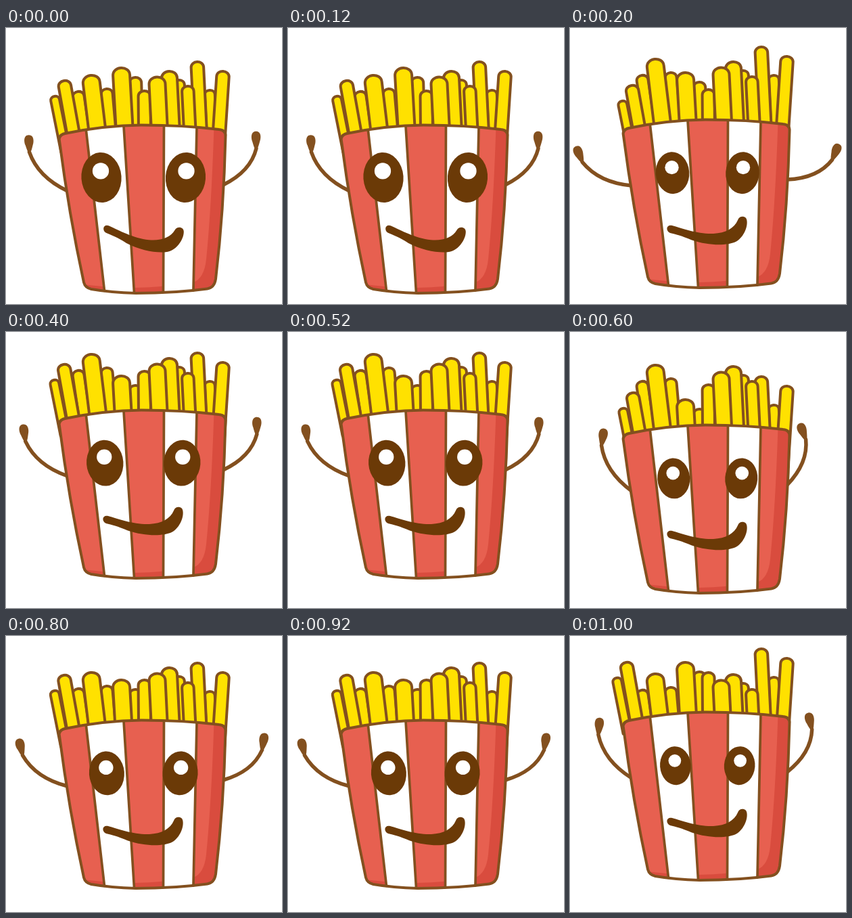
These frames come from a looping animation (408 by 408 pixels, 1.2 s). An HTML page with a canvas:

```html
<!DOCTYPE html>
<html lang="en">
<head>
<meta charset="utf-8">
<title>Happy fries</title>
<style>
  html, body { margin: 0; width: 100%; height: 100%; overflow: hidden; background: #fff; }
  canvas { display: block; width: 100vmin; height: 100vmin; }
</style>
</head>
<body>
<canvas id="stage"></canvas>
<script>
const SIZE = 408, STEP = 200;
const LINE = '#83501f', DARK = '#6b3a07', YELLOW = '#ffe100', RED = '#e76050', SHADE = '#d94c3e';

const canvas = document.getElementById('stage');
const scale = Math.max(1, window.devicePixelRatio || 1);
canvas.width = canvas.height = SIZE * scale;
const ctx = canvas.getContext('2d');

// Key poses: lift of the box, eye height, arm swing in degrees (left, right),
// slide of each bunch of fries inside the box, tilt of the smile
const poses = [
  { lift: 0, eye: 37, arms: [37, 34], slide: [0, 0, 0, 0, 0, 0], tilt: .148 },
  { lift: 8, eye: 31, arms: [57, 58], slide: [15, -16, 15, 6, -6, -14], tilt: 0 },
  { lift: 28, eye: 34, arms: [43, 35], slide: [-2, -9, 34, -7, 3, 9], tilt: 0 },
  { lift: 6, eye: 30, arms: [26, 14], slide: [18, -15, 47, -9, -7, 22], tilt: 0 },
  { lift: 19, eye: 32.5, arms: [48, 44], slide: [-1, 3, 25, -9, 2, 9], tilt: 0 },
  { lift: 31, eye: 28.5, arms: [30, 22], slide: [-8, 17, 11, -8, 24, 0], tilt: 0 }
];

// Back to front: bunch, top x, top y, width
const fries = [
  [0, 70, 101, 13], [1, 106, 94, 17], [0, 84, 78, 18.5],
  [1, 148.5, 90, 17], [1, 125, 70, 25],
  [2, 191, 73, 18], [2, 170, 59, 25], [3, 204.5, 93, 18],
  [4, 255.5, 77, 16], [4, 241, 64, 23], [4, 223, 72.5, 24],
  [5, 301, 92, 15], [5, 282.5, 50, 18.5], [5, 321, 64, 18.5],
  [4, 268.5, 86, 17.5]
];
const FRY_END = 184;

const box = new Path2D(`M79 167 Q77 158.500 87 156 Q145 144 200 143.500
  Q262 143.500 315 150 Q325 151 324.500 160 Q322 270 310 371
  Q308 384 297.500 385.500 Q250 392 192 392 Q155 391 126 386
  Q117 384 115 376 Q93 275 79 167 Z`);
const lit = new Path2D(`M60 130 L308 130 C305 230 301 290 296 342 Q293 370 277 376
  Q233 383 190 384 Q145 384 100 377 Z`);
const stripes = new Path2D(`M118.500 150 L145.500 389 L60 400 L60 140 Z
  M174 130 L189.500 395 L232.500 395 L233.500 130 Z M282 130 L277 395 L340 395 L340 130 Z`);
const seams = new Path2D(`M118.500 152 L145.500 388.500 M174 145 L189.500 391.500
  M233.500 145 L232.500 390.500 M282 147 L277 388`);
const mouth = new Path2D(`M151 300 C165 304 190 313 212 312 C230 311 243 304 248 292
  C250 285 261 285 261.500 293 C263 304 255 319 245 324 C232 330 205 330 180 321.500
  C165 315 156 313 148 311 C141 308 142 298 151 300 Z`);
const hand = new Path2D('M0 -7 C8 -7 7.500 3 5.500 8 C4 13 3 18 0 21 C-3 18 -4 13 -5.500 8 C-7.500 3 -8 -7 0 -7 Z');

function placed(x, y, turn, draw) {
  ctx.save();
  ctx.translate(x, y);
  ctx.rotate(turn);
  draw();
  ctx.restore();
}

// Fries fan out to the left, and the one at the right edge leans outward
function leanAt(x) {
  if (x < 215) return (210 - x) / 700;
  return x < 310 ? .05 : -.065;
}

function drawFry([bunch, x, y, w], { lift, slide }) {
  const drift = bunch === 0 ? 1.5 + slide[0] * .35 : 0;
  const h = w / 2, r = h * .88, len = FRY_END - y;
  placed(x + drift, y + slide[bunch] - lift, -Math.atan(leanAt(x)), () => {
    ctx.beginPath();
    ctx.moveTo(-h, len);
    ctx.lineTo(-h, r);
    ctx.bezierCurveTo(-h, r * .35, -h * .5, 0, 0, 0);
    ctx.bezierCurveTo(h * .5, 0, h, r * .35, h, r);
    ctx.lineTo(h, len);
    ctx.closePath();
    ctx.fillStyle = YELLOW;
    ctx.fill();
    ctx.lineWidth = 4;
    ctx.stroke();
  });
}

// A rigid arm that swings about its shoulder; side is -1 (left) or 1 (right)
function drawArm(x, y, reach, swing, side) {
  placed(x, y, side * swing * Math.PI / 180, () => {
    ctx.scale(-side, 1);
    ctx.beginPath();
    ctx.moveTo(0, 0);
    ctx.quadraticCurveTo(-22.5, -reach * .45, -10.5, 15 - reach);
    ctx.lineWidth = 5.5;
    ctx.stroke();
    placed(0, -reach, .6, () => {
      ctx.fillStyle = LINE;
      ctx.fill(hand);
    });
  });
}

function drawBox() {
  ctx.fillStyle = '#fff';
  ctx.fill(box);
  ctx.save();
  ctx.clip(box);
  ctx.fillStyle = SHADE;
  ctx.fill(stripes);
  ctx.clip(stripes);
  ctx.fillStyle = RED;
  ctx.fill(lit);
  ctx.restore();
  ctx.lineWidth = 3.7;
  ctx.stroke(seams);
  ctx.lineWidth = 4;
  ctx.stroke(box);
}

function oval(rx, ry, y, color) {
  ctx.beginPath();
  ctx.ellipse(0, y, rx, ry, 0, 0, Math.PI * 2);
  ctx.fillStyle = color;
  ctx.fill();
}

// Smaller eyes sit closer together
function drawEye(x, ry, side) {
  const rx = ry * .8, shut = 37 - ry;
  const cx = x - side * shut * 1.75, cy = 221 + shut * .2;
  placed(cx, cy, side * .07, () => oval(rx, ry, 0, DARK));
  placed(cx + side, cy, 0, () => oval(rx * .41, rx * .41, -ry * .26, '#fff'));
}

function drawMouth(tilt) {
  placed(203, 306, tilt, () => {
    ctx.translate(-203, -306);
    ctx.fillStyle = DARK;
    ctx.fill(mouth);
  });
}

function draw(pose) {
  ctx.setTransform(scale, 0, 0, scale, 0, 0);
  ctx.fillStyle = '#fff';
  ctx.fillRect(0, 0, SIZE, SIZE);
  ctx.strokeStyle = LINE;
  ctx.lineJoin = ctx.lineCap = 'round';

  const { lift, eye, arms, tilt } = pose;
  drawArm(91, 241 - lift, 95, arms[0], -1);
  drawArm(321, 232 - lift, 87, arms[1], 1);
  fries.forEach(fry => drawFry(fry, pose));
  placed(0, -lift, 0, () => {
    drawBox();
    drawEye(141, eye, -1);
    drawEye(265.5, eye, 1);
    drawMouth(tilt);
  });
}

const start = performance.now();
let shown = null;
function tick() {
  const pose = poses[Math.floor((performance.now() - start) / STEP) % poses.length];
  if (pose !== shown) draw(shown = pose);
  requestAnimationFrame(tick);
}
tick();
</script>
</body>
</html>
```
